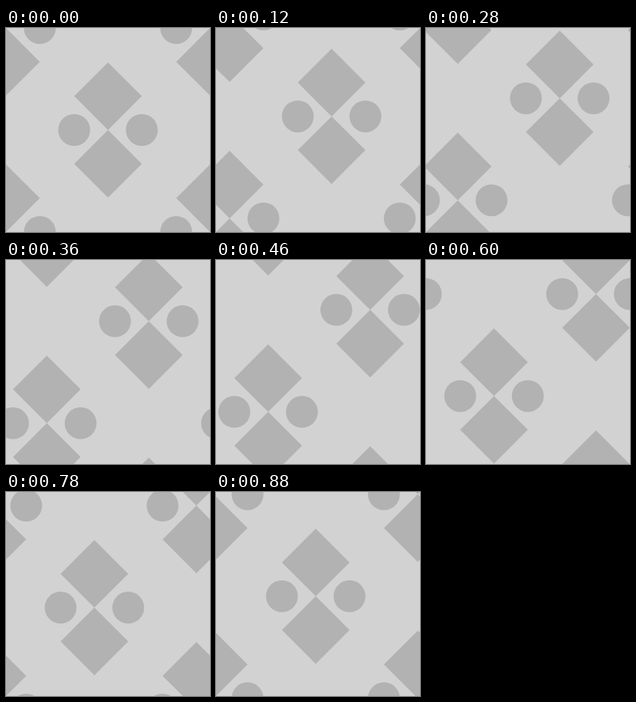
Recreate the animation shown at these times as an HTML page with a canvas. Size 256 by 256 pixels, loop 900 ms.

```html
<!DOCTYPE html>
<html lang="en">
<head>
<meta charset="utf-8">
<title>Drifting diamonds</title>
<style>
  html, body { margin: 0; height: 100%; overflow: hidden; background: #d2d2d2; }
  canvas { display: block; }
</style>
</head>
<body>
<canvas id="stage" width="256" height="256"></canvas>
<script>
const ctx = document.getElementById('stage').getContext('2d');
const LOOP = 900, STEP = 20, CELL = 128;
const HALF = 30 * Math.SQRT2; // half diagonal of a 60px square
const RADIUS = 20;

function diamond(x, y) {
  ctx.beginPath();
  ctx.moveTo(x, y - HALF);
  ctx.lineTo(x + HALF, y);
  ctx.lineTo(x, y + HALF);
  ctx.lineTo(x - HALF, y);
  ctx.fill();
}

function disc(x, y) {
  ctx.beginPath();
  ctx.arc(x, y, RADIUS, 0, Math.PI * 2);
  ctx.fill();
}

function motif(x, y) {
  diamond(x, y - HALF);
  diamond(x, y + HALF);
  disc(x - HALF, y);
  disc(x + HALF, y);
}

function draw(time) {
  const t = Math.floor((time % LOOP) / STEP) * STEP;
  const shift = CELL * t / LOOP;
  ctx.fillStyle = '#d2d2d2';
  ctx.fillRect(0, 0, 256, 256);
  ctx.fillStyle = '#b2b2b2';
  // Checkerboard lattice sliding one cell up and to the right per loop
  for (let col = -2; col <= 3; col++) {
    for (let row = -1; row <= 4; row++) {
      if ((col + row) % 2 === 0) motif(col * CELL + shift, row * CELL - shift);
    }
  }
}

const start = performance.now();
function tick() {
  draw(performance.now() - start);
  requestAnimationFrame(tick);
}
tick();
</script>
</body>
</html>
```
